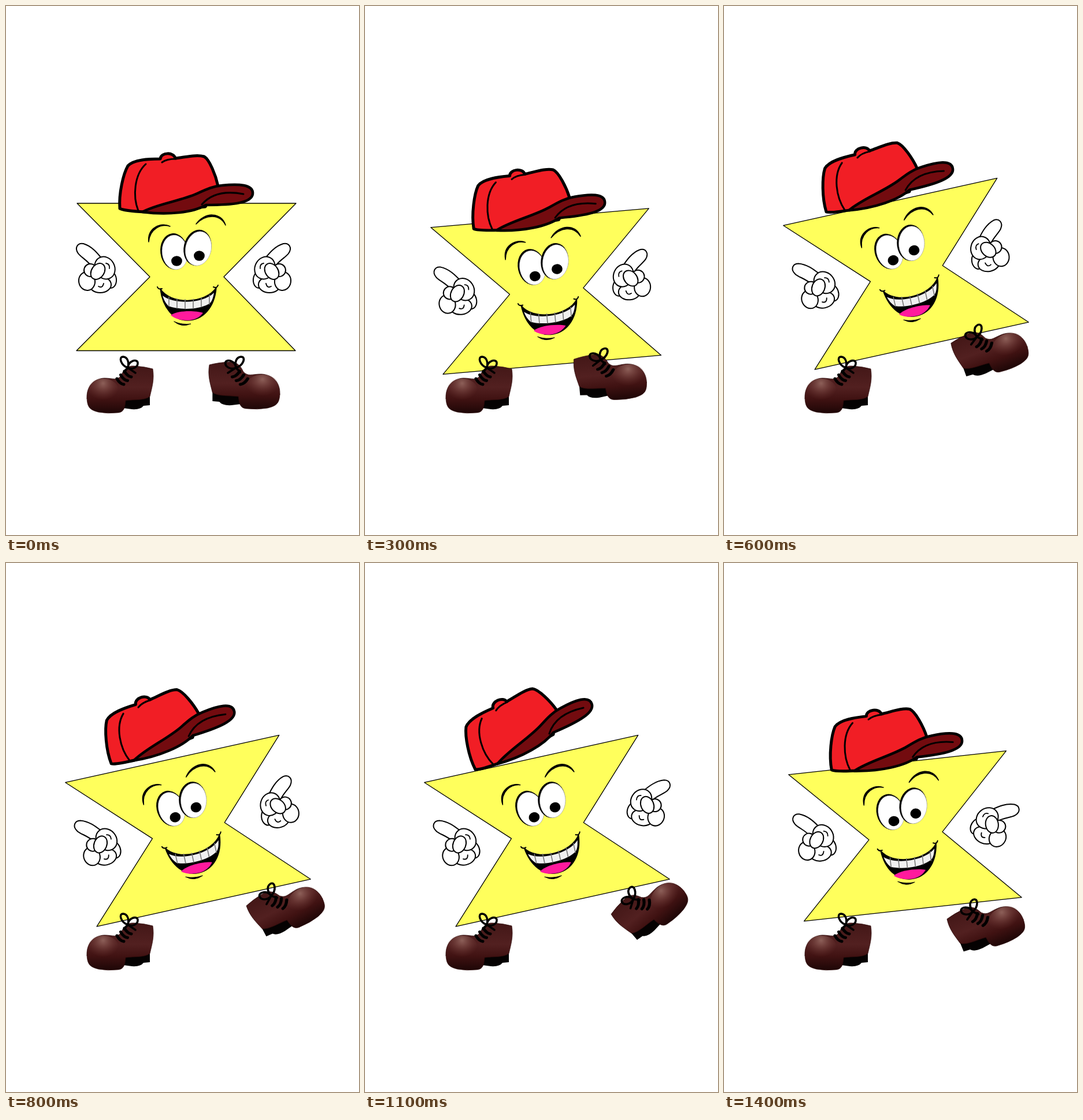
These frames come from a looping animation (611x917 px, 1.5 s). An HTML page with a canvas:

```html
<!DOCTYPE html>
<html lang="en">
<head>
<meta charset="utf-8">
<title>Stepping character</title>
<style>
html, body { margin: 0; width: 100%; height: 100%; overflow: hidden; background: #fff; }
canvas { display: block; }
</style>
</head>
<body>
<canvas id="stage" width="611" height="917"></canvas>
<script>
const ctx = document.getElementById('stage').getContext('2d');
const STEP = 100, STEPS = 15;

function shape(d, fill, width = 0, color = '#000') {
  const path = new Path2D(d);
  if (fill) { ctx.fillStyle = fill; ctx.fill(path); }
  if (width) { ctx.lineWidth = width; ctx.strokeStyle = color; ctx.stroke(path); }
}

function oval(x, y, rx, ry, deg, fill, width = 0, color = '#000') {
  ctx.beginPath();
  ctx.ellipse(x, y, rx, ry, deg * Math.PI / 180, 0, 7);
  ctx.fillStyle = fill;
  ctx.fill();
  if (width) { ctx.lineWidth = width; ctx.strokeStyle = color; ctx.stroke(); }
}

// Moves and turns a part about its own centre.
function turned(cx, cy, dx, dy, deg, draw) {
  ctx.save();
  ctx.translate(cx + dx, cy + dy);
  ctx.rotate(deg * Math.PI / 180);
  ctx.translate(-cx, -cy);
  draw();
  ctx.restore();
}

function mirrored(x, y, stretch, draw) {
  ctx.save();
  ctx.translate(x, y);
  ctx.scale(-stretch, 1);
  draw();
  ctx.restore();
}

function drawTorso() {
  shape('M123 342H502L377 469.5L501 597.5H122L249 469.5Z', '#ffff5c', 1.3);
}

function drawEye(x, y, tilt, pupilX, pupilY) {
  oval(x - 1, y - 1.5, 23.8, 31.5, tilt, '#000');
  oval(x + 0.5, y, 22.3, 30, tilt, '#fff', 0.6, '#999');
  oval(pupilX, pupilY, 9.4, 8.7, 0, '#000');
}

function drawFace() {
  shape('M247 409C244 384 269 374 284 382C268 377 249 386 247 409Z', '#000', 1.5);
  shape('M329 378C343 357 373 356 380 380C370 360 346 361 329 378Z', '#000', 1.5);
  drawEye(292, 427, -7, 295.5, 442);
  drawEye(332.5, 420.5, 13, 334.5, 433);

  shape('M267 490C284 518 345 517 364 488C361 524 340 545 314 545C290 545 271 524 267 490Z', '#000', 1.5);
  shape('M271 502C291 518 342 516 360 497C358 509 355 515 350 517C330 528 295 526 281 520C276 515 273 509 271 502Z', '#f0f0f0');
  for (let i = 0; i < 6; i++) {
    const x = 282 + 14 * i, y = 513 - (x - 312) ** 2 / 200;
    shape(`M${x} ${y - 4}V${y + 12}`, null, 1.6, '#777');
  }
  shape('M285 536C298 527 328 528 341 532C335 540 325 545 314 545C303 545 292 542 285 536Z', '#ff1a9d');
  shape('M262 487Q264 492 270 490M359 487Q365 490 367 484', null, 2);
  shape('M291 547Q305 553 320 551Q304 558 291 547Z', '#000', 0.8);
}

function drawHat() {
  shape('M197 351C195 325 203 291 211 277C221 266 247 265 267 265C268 253 291 253 293 264C311 262 330 257 343 261C352 266 363 293 367 312L345 348L240 357Q204 355 197 351Z', '#f11e25', 5);
  shape('M236 357C262 343 302 338 331 325C348 317 360 312 374 311C402 308 429 309 427 326C425 341 395 345 346 345C324 358 280 363 236 357Z', '#730b0f', 4.5);
  shape('M242 274C222 292 219 330 229 355', null, 3);
  shape('M270 271Q278 265 294 265', null, 3);
  shape('M339 344C357 323 385 321 411 326', null, 3);
}

// Pointing left; the right hand is its mirror image.
function drawHand(fingerShift) {
  const lobe = (x, y, rx, ry, deg) => oval(x, y, rx, ry, deg, '#fff', 2);
  ctx.save();
  ctx.translate(fingerShift, 0);
  shape('M150 454C142 441 130 436 125 429C118 419 124 410 134 412C148 416 158 428 166 438', '#fff', 2);
  ctx.restore();
  lobe(180, 474, 11, 15, -8);
  lobe(163, 483, 19, 14, 0);
  lobe(140, 477, 14, 16, -10);
  lobe(171, 454, 17, 20, -28);
  lobe(146, 458, 11, 11, 20);
  lobe(159, 460, 11, 15, 34);
  shape('M173 446Q180 447 179 455M160 486Q167 490 169 481', null, 1.8);
}

function drawShoe(laceDrop) {
  shape('M203 682L249 670V692L238 693Q233 700 218 699L203 697Z', '#050202');
  const leather = ctx.createLinearGradient(0, 624, 0, 706);
  leather.addColorStop(0, '#431717');
  leather.addColorStop(0.45, '#522020');
  leather.addColorStop(0.7, '#401212');
  leather.addColorStop(1, '#1d0606');
  shape('M140 680C139 660 151 646 170 645C186 645 191 650 199 641C204 629 211 623 222 624Q240 625 254 629C257 647 253 660 249 677C240 684 222 682 207 684C206 696 204 705 193 705Q176 707 160 704C145 700 141 696 140 680Z', leather, 0.7, '#2b0b0b');
  const shine = ctx.createRadialGradient(168, 654, 1, 168, 654, 30);
  shine.addColorStop(0, 'rgba(178,135,124,.6)');
  shine.addColorStop(1, 'rgba(120,60,55,0)');
  oval(168, 664, 26, 18, 0, shine);

  ctx.save();
  ctx.translate(0, laceDrop);
  for (let i = 0; i < 3; i++) {
    const x = 192 + 6.5 * i, y = 646 - 6.5 * i;
    shape(`M${x} ${y}q5 9 12 10`, null, 5);
  }
  shape('M211 627C199 623 194 608 203 608C211 609 213 618 211 627C212 615 226 611 228 618C229 626 219 631 211 627L204 635M211 627L224 636', null, 3.5);
  ctx.restore();
}

function render(step) {
  const ramp = (from, to) => Math.min(1, Math.max(0, (step - from) / (to - from)));
  const back = ramp(12, 16), settle = ramp(12, 14);
  const lean = ramp(1, 6) - back;
  const dip = 35 * ramp(0, 2) - 40.5 * ramp(2, 6) + 18 * back;
  const hop = 41 * ramp(4, 9) - 32 * ramp(10, 14);
  const wave = ramp(6, 12);
  const kick = ramp(2, 6), away = 1 - back;

  ctx.fillStyle = '#fff';
  ctx.fillRect(0, 0, 611, 917);
  ctx.lineJoin = ctx.lineCap = 'round';

  const tilt = -12.5 * lean;
  const withBody = (dx, dy, draw) => turned(312, 470, 3 * lean + dx, dip + dy, tilt, draw);

  withBody(0, 0, () => {
    drawTorso();
    drawFace();
    drawHand(0);
  });
  withBody(0, -hop, () =>
    turned(312, 308, 0, 0, -12.7 * (wave - settle), drawHat));
  withBody(40 * wave - 33 * settle, 10 * settle - 4 * wave, () =>
    turned(460, 455, 0, 0, 32 * ramp(8, 12), () => mirrored(619, 0, 1, () => drawHand(5))));

  drawShoe(0);
  const reach = 48.5 * kick + 24 * ramp(6, 8) + 11.5 * ramp(8, 12);
  turned(412, 655, reach * away, -60 * kick * away, -(20 * kick + 24.5 * wave) * away, () =>
    mirrored(623.8, -7, 1.07, () => drawShoe(7)));
}

function tick() {
  render(Math.floor(performance.now() / STEP) % STEPS);
  requestAnimationFrame(tick);
}
tick();
</script>
</body>
</html>
```
